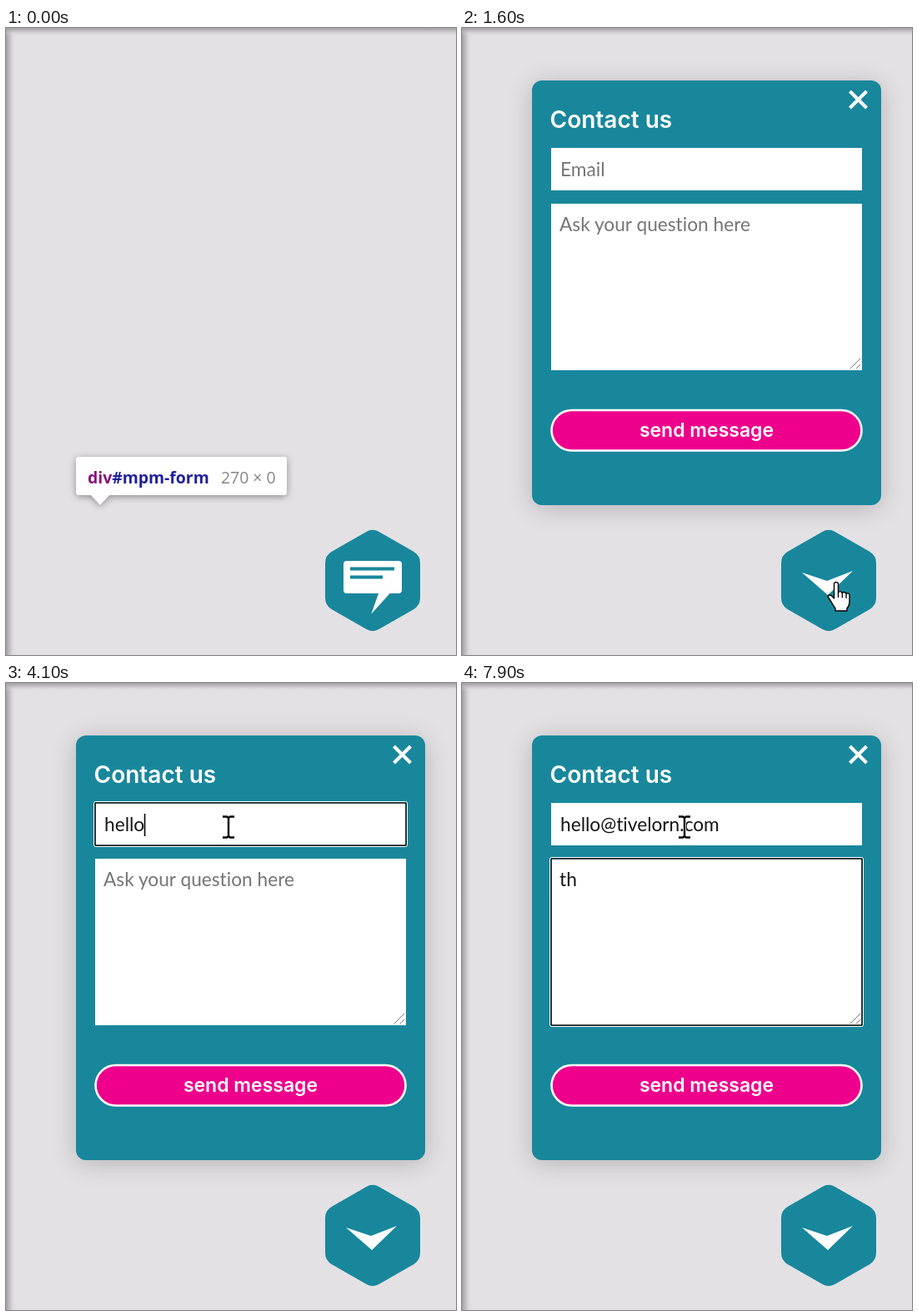
Animation of 540 by 753 pixels, one loop 8 s. Source, as an HTML page:

```html
<!DOCTYPE html>
<html lang="en">
<head>
<meta charset="utf-8">
<title>Contact form</title>
<style>
  html, body { margin: 0; width: 100%; height: 100%; overflow: hidden; background: #e3e1e4; }
  svg { display: block; width: 540px; height: 753px; }
  text { white-space: pre; font-variant-ligatures: none; }
  .head { font-family: Inter, sans-serif; font-weight: 600; fill: #fff; }
  .body { font-family: Lato, sans-serif; font-size: 22.7px; }
  .tip { font-family: "Open Sans", sans-serif; font-size: 19.4px; }
</style>
</head>
<body>
<svg viewBox="0 0 540 753">
  <defs>
    <linearGradient id="edge">
      <stop offset="0" stop-color="#a09ea1"/>
      <stop offset=".35" stop-color="#b4b2b5" stop-opacity=".75"/>
      <stop offset="1" stop-color="#e3e1e4" stop-opacity="0"/>
    </linearGradient>
    <linearGradient id="edgeTop" href="#edge" x2="0" y2="1"/>
    <filter id="soft" x="-30%" y="-30%" width="160%" height="160%"><feGaussianBlur stdDeviation="15"/></filter>
    <filter id="near" x="-20%" y="-50%" width="140%" height="200%">
      <feDropShadow dx="0" dy="2" stdDeviation="4" flood-opacity=".38"/>
    </filter>
    <clipPath id="clip"><rect id="clipBox" x="84" y="0" width="419" height="510" rx="12"/></clipPath>
  </defs>

  <rect width="540" height="753" fill="#e3e1e4"/>
  <rect width="12" height="753" fill="url(#edge)"/>
  <rect width="540" height="10" fill="url(#edgeTop)"/>

  <g id="tip">
    <path filter="url(#near)" fill="#fff"
      d="M88 515H333Q337 515 337 519V557Q337 561 333 561H124L113 572.5L102 561H88Q84 561 84 557V519Q84 515 88 515Z"/>
    <text class="tip" x="98" y="547" font-weight="700"><tspan fill="#881280">div</tspan><tspan fill="#20209e">#mpm-form</tspan></text>
    <text class="tip" x="258" y="547" fill="#888">270 × 0</text>
  </g>

  <g id="form">
    <rect id="shade" x="84" width="419" rx="12" fill="#000" opacity=".2" filter="url(#soft)"/>
    <g id="panel"><g clip-path="url(#clip)">
      <rect x="84" width="419" height="510" fill="#18879c"/>
      <path d="M465.5 13L485.5 33M485.5 13L465.5 33" stroke="#fff" stroke-width="4"/>
      <text class="head" x="105.5" y="57" font-size="28">Contact us</text>
      <rect x="107" y="81" width="373" height="51" fill="#fff"/>
      <rect x="107" y="148" width="373" height="200" fill="#fff"/>
      <path d="M466 346L478 334M473 346L478 341" stroke="#777" stroke-width="1"/>
      <g id="ring" fill="none">
        <rect x="105.5" width="376" rx="2" stroke="#fff"/>
        <rect x="107" width="373" rx="1" stroke="#101010" stroke-width="1.6"/>
      </g>
      <text id="email" class="body" x="118" y="115"></text>
      <text id="note" class="body" x="117" y="181"></text>
      <rect id="caret" width="1.6" height="27" fill="#000"/>
      <rect x="107.5" y="396" width="372" height="48.5" rx="24.2" fill="#ee008c" stroke="#fff" stroke-width="2.6"/>
      <text class="head" x="293.5" y="428" font-size="23" text-anchor="middle">send message</text>
    </g></g>
  </g>

  <path d="M440 619L481 642.7V684.3L440 708L399 684.3V642.7Z" fill="#18879c"
    stroke="#18879c" stroke-width="32" stroke-linejoin="round"/>
  <path id="wing" d="M408 654L438 664L469 652L439 681Z" fill="#fff"/>
  <rect id="bubble" x="405" y="640" width="70" height="39" rx="4" fill="#fff"/>
  <path id="lines" d="M413 649.5H466M413 659.5H452" stroke="#18879c" stroke-width="4"/>

  <g id="arrow"><path d="M0 0V25L6 19.5L10 29L14.5 27L10.5 18H18.5Z" fill="#fff" stroke="#000" stroke-width="1.5"/></g>
  <g id="hand">
    <path d="M-2.5 1Q0 -2 2.5 1V12Q5 9 7.3 12.5Q10 10 12 13.5Q15 11.5 16 15V23Q16 28 13 31V34H-1V31Q-4 27 -6 23L-10 17Q-9 13.5 -5.5 16L-2.5 19Z"
      fill="#fff" stroke="#000" stroke-width="1.4" stroke-linejoin="round"/>
    <path d="M2.5 12V18M7.3 13V18.5M12 14V19" stroke="#000" stroke-width="1.3"/>
  </g>
  <g id="beam" fill="none">
    <path d="M-7 -12.5H-2L0 -11L2 -12.5H7M0 -11V11M-7 12.5H-2L0 11L2 12.5H7" stroke="#fff" stroke-width="4"/>
    <path d="M-7 -12.5H-2L0 -11L2 -12.5H7M0 -11V11M-7 12.5H-2L0 11L2 12.5H7" stroke="#000" stroke-width="2.4"/>
  </g>
</svg>
<script>
const LOOP = 8000, STEP = 100, FULL = 510, BOTTOM = 573, BLINK = 400;
const OPEN = 1200, SLIDE = 394, FOCUS_MAIL = 2700, FOCUS_NOTE = 7000;
const el = id => document.getElementById(id);
const set = (node, attrs) => { for (const k in attrs) node.setAttribute(k, attrs[k]); };
const show = (id, on) => { el(id).style.display = on ? "" : "none"; };
const span = (t, from, length) => Math.min(1, Math.max(0, (t - from) / length));
const swing = p => 0.5 - Math.cos(p * Math.PI) / 2;

const mail = {
  id: "email", text: "hello@tivelorn.com", hint: "Email", x: 118, caretY: 94, ringY: 81, height: 51, focus: FOCUS_MAIL,
  keys: [3700, 3800, 3900, 4000, 4100, 4400, 5100, 5300, 5500,
    ...Array.from({ length: 9 }, (_, i) => 5900 + i * 100)]
};
const note = {
  id: "note", text: "th", hint: "Ask your question here", x: 117, caretY: 160, ringY: 148, height: 200, focus: FOCUS_NOTE,
  keys: [7400, 7500]
};

// time, x, y of the pointer tip
const route = [[300, 541, 640], [900, 449, 666], [1600, 449, 666], [2200, 270, 174.5], [2400, 270, 174.5], [2700, 267, 173]];

function pointer(t) {
  const i = route.findIndex(r => r[0] > t);
  if (i < 0) return route.at(-1).slice(1);
  if (i === 0) return null;
  const [a, b] = [route[i - 1], route[i]];
  const p = swing(span(t, a[0], b[0] - a[0]));
  return [a[1] + (b[1] - a[1]) * p, a[2] + (b[2] - a[2]) * p];
}

function pointerKind(x, y, t) {
  if (y > 603) return x < 497 ? "hand" : "arrow";
  if (t < OPEN || x < 107 || x > 480) return "arrow";
  if (y > 458 && y < 509) return "hand";
  return (y > 211 && y < 411) || (y > 144 && y < 195) ? "beam" : "arrow";
}

function drawField(f, t) {
  const count = f.keys.filter(k => k <= t).length;
  const node = el(f.id);
  node.textContent = count ? f.text.slice(0, count) : f.hint;
  set(node, { fill: count ? "#151515" : "#757575" });
  return count;
}

function drawFocus(f, t, count) {
  const last = count ? f.keys[count - 1] : f.focus;
  const [halo, line] = el("ring").children;
  set(halo, { y: f.ringY - 1.5, height: f.height + 3 });
  set(line, { y: f.ringY, height: f.height });
  const width = count ? el(f.id).getComputedTextLength() : 0;
  set(el("caret"), { x: f.x + width - 0.5, y: f.caretY });
  show("caret", (t - last) % (2 * BLINK) < BLINK);
}

function drawForm(t) {
  const height = FULL * swing(span(t, OPEN, SLIDE));
  show("form", height > 0);
  set(el("panel"), { transform: `translate(0 ${BOTTOM - height})` });
  set(el("clipBox"), { height });
  set(el("shade"), { y: BOTTOM - height + 4, height });
  const counts = [mail, note].map(f => drawField(f, t));
  const active = t >= FOCUS_NOTE ? 1 : 0;
  show("ring", t >= FOCUS_MAIL);
  show("caret", false);
  if (t >= FOCUS_MAIL) drawFocus([mail, note][active], t, counts[active]);
}

function drawIcon(t) {
  const rest = (1 - span(t, OPEN, 400)) ** 2;
  set(el("bubble"), { opacity: rest });
  set(el("lines"), { opacity: rest });
  set(el("wing"), { transform: `rotate(${-89 * rest} 448.5 663.5)` });
}

function drawPointer(t) {
  const at = pointer(t);
  const kind = at && pointerKind(...at, t);
  for (const id of ["arrow", "hand", "beam"]) show(id, id === kind);
  if (at) set(el(kind), { transform: `translate(${at})` });
}

function draw(t) {
  show("tip", t < 300);
  drawForm(t);
  drawIcon(t);
  drawPointer(t);
}

// Motion advances ten times a second
const start = performance.now();
function tick() {
  const t = (performance.now() - start) % LOOP;
  draw(Math.floor(t / STEP) * STEP);
  requestAnimationFrame(tick);
}
tick();
</script>
</body>
</html>
```
